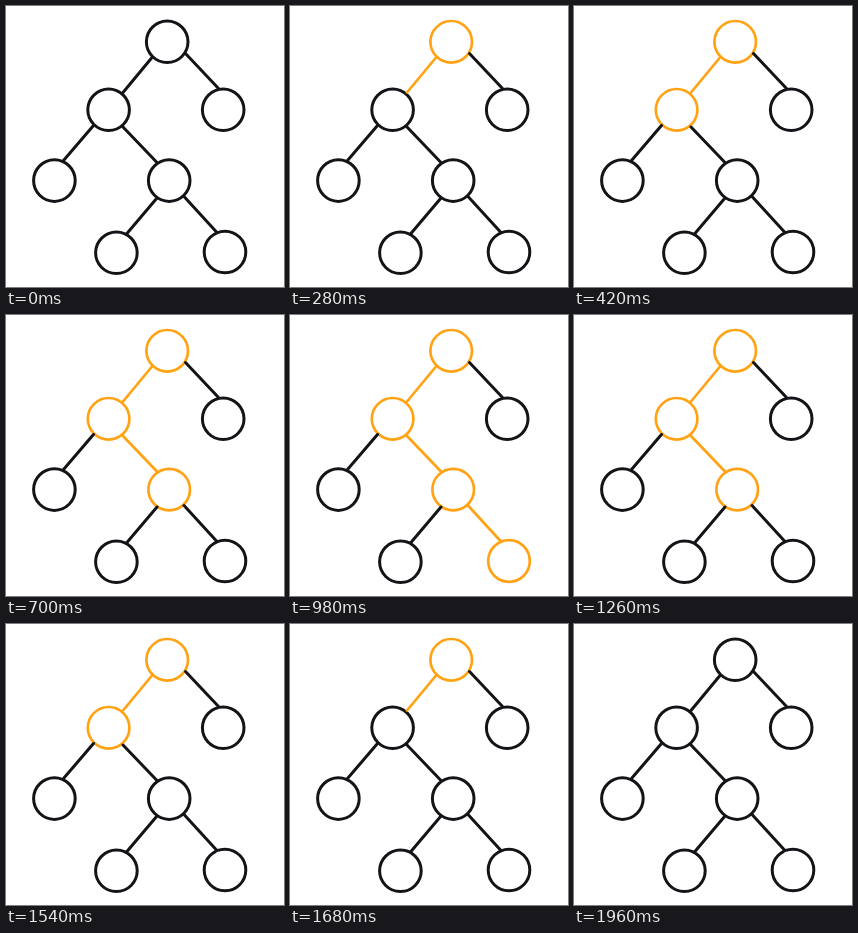
Write an HTML page that moves like this. It is 278 by 281 pixels and loops after 2.1 s.

```html
<!DOCTYPE html>
<html>
<head>
<meta charset="utf-8">
<style>
  html, body { margin: 0; width: 100%; height: 100%; overflow: hidden; background: #fff; }
  svg { display: block; }
  circle, line { fill: none; stroke: #141418; stroke-width: 3; stroke-linecap: round; }
  .on { stroke: #ffa314; stroke-width: 2.7; }
</style>
</head>
<body>
<svg width="278" height="281" viewBox="0 0 278 281">
  <circle cx="161.2" cy="35.8" r="20.8" data-step="1"/>
  <circle cx="102.6" cy="103.8" r="20.8" data-step="3"/>
  <circle cx="217.2" cy="103.8" r="20.8"/>
  <circle cx="48.4" cy="174.6" r="20.8"/>
  <circle cx="163.2" cy="174.6" r="20.8" data-step="5"/>
  <circle cx="110.4" cy="246.8" r="20.8"/>
  <circle cx="219" cy="246" r="20.8" data-step="7"/>
  <line x1="146" y1="51.5" x2="117" y2="86.5" data-step="2"/>
  <line x1="179.5" y1="47.5" x2="212.5" y2="82.5"/>
  <line x1="87.5" y1="119.5" x2="57.5" y2="154.5"/>
  <line x1="117" y1="121" x2="150.5" y2="156" data-step="4"/>
  <line x1="151" y1="192" x2="120.5" y2="228" />
  <line x1="178" y1="190.5" x2="210.5" y2="226" data-step="6"/>
</svg>
<script>
  const TICK = 140, TICKS = 15, PEAK = 7;
  const path = document.querySelectorAll('[data-step]');

  // The highlight walks down the path one part per tick, then back up.
  function draw() {
    const tick = Math.floor(performance.now() / TICK) % TICKS;
    const reached = PEAK - Math.abs(PEAK - tick);
    for (const part of path) part.classList.toggle('on', part.dataset.step <= reached);
    requestAnimationFrame(draw);
  }
  draw();
</script>
</body>
</html>
```
